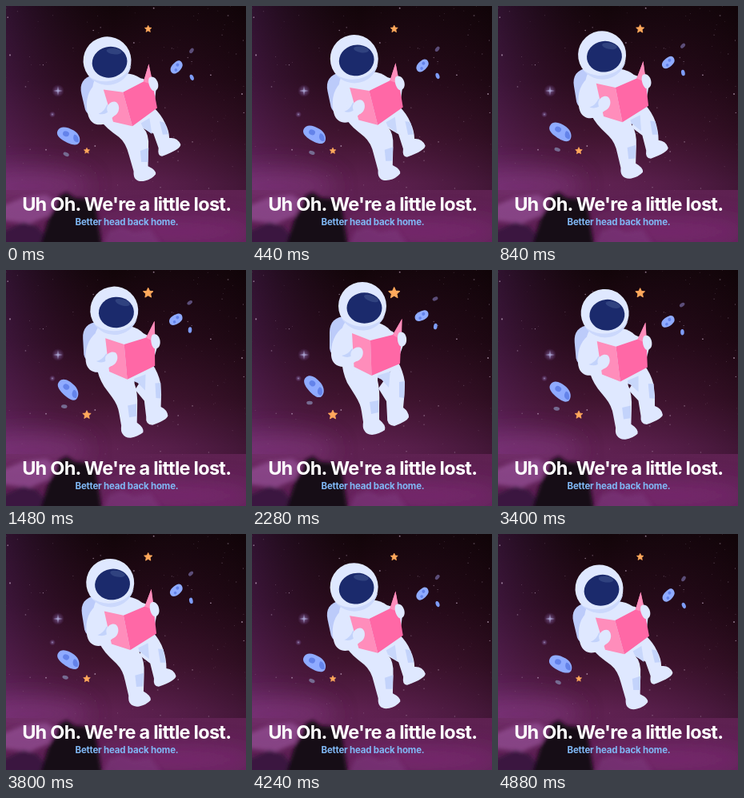
An HTML page that plays this animation: 300 px wide and 295 px high, repeating every 4.92 s.

```html
<!DOCTYPE html>
<html lang="en">
<head>
<meta charset="utf-8">
<style>
  html, body { margin: 0; width: 100%; height: 100%; overflow: hidden; background: #14060f; }
  svg { display: block; width: 300px; height: 295px; }
  text { font-family: Inter, sans-serif; font-weight: 700; text-anchor: middle; }
</style>
</head>
<body>
<svg viewBox="0 0 300 295">
  <defs>
    <linearGradient id="sky" x2="0" y2="1">
      <stop offset="0" stop-color="#120509"/>
      <stop offset=".3" stop-color="#250a18"/>
      <stop offset=".55" stop-color="#40142f"/>
      <stop offset=".75" stop-color="#5e2150"/>
      <stop offset="1" stop-color="#5f2257"/>
    </linearGradient>
    <linearGradient id="side">
      <stop offset="0" stop-color="#7a3390" stop-opacity=".28"/>
      <stop offset=".45" stop-color="#3c1232" stop-opacity="0"/>
      <stop offset="1" stop-color="#0c0205" stop-opacity=".35"/>
    </linearGradient>
    <radialGradient id="glow">
      <stop offset="0" stop-color="#b5b5e0" stop-opacity=".8"/>
      <stop offset=".35" stop-color="#8f74b4" stop-opacity=".45"/>
      <stop offset="1" stop-color="#8054a0" stop-opacity="0"/>
    </radialGradient>
    <filter id="soft" x="-30%" y="-50%" width="160%" height="200%"><feGaussianBlur stdDeviation="2.5"/></filter>
    <filter id="haze" x="-50%" y="-50%" width="200%" height="200%"><feGaussianBlur stdDeviation="14"/></filter>
    <path id="star" d="M0-6.5 1.9-2.4 6.3-2 3 1.1 3.9 5.5 0 3.2-3.9 5.5-3 1.1-6.3-2-1.9-2.4Z"
      fill="#ffa95c" stroke="#ffa95c" stroke-linejoin="round"/>
  </defs>

  <rect width="300" height="295" fill="url(#sky)"/>
  <rect width="300" height="230" fill="url(#side)"/>
  <g filter="url(#haze)">
    <ellipse cx="30" cy="225" rx="75" ry="22" fill="#8a3c88" opacity=".5"/>
    <ellipse cx="215" cy="282" rx="100" ry="16" fill="#8b3080" opacity=".6"/>
  </g>
  <g filter="url(#soft)">
    <path d="M-5 250 20 240 50 236 62 244 54 262 30 272-5 268Z" fill="#935095" opacity=".75"/>
    <path d="M-5 282 22 270 40 276 58 300H-5Z" fill="#3a1740"/>
    <path d="M42 300 54 264 64 250 66 238 76 233 86 240 100 241 112 249 115 270 120 300Z" fill="#150812"/>
    <path d="M122 300 128 282 145 276 160 283 180 279 195 300Z" fill="#7c3a7c" opacity=".6"/>
  </g>
  <g id="stars" fill="#cdb3cc"></g>
  <circle cx="65" cy="106" r="8" fill="url(#glow)"/>
  <path d="M65 100 65.7 105.3 71 106 65.7 106.7 65 112 64.3 106.7 59 106 64.3 105.3Z" fill="#a9a2d0"/>
  <circle cx="58" cy="135.5" r="4" fill="url(#glow)"/>

  <use id="starA" href="#star"/>
  <use id="starB" href="#star"/>

  <g id="rockA">
    <path d="M-15-2C-14-9-5-10 4-8 12-6 16 0 15 5 13 11 3 10-5 8-12 6-16 3-15-2Z" fill="#8fabff"/>
    <ellipse cx="-4" cy="-1" rx="4" ry="3.4" fill="#6483ea"/>
    <path d="M6-3C9-5 14 0 14 4 11 7 5 4 6-3Z" fill="#6483ea"/>
  </g>
  <ellipse id="pebbleA" rx="3.8" ry="2.3" fill="#756b91"/>
  <g id="rockB">
    <path d="M-9 0C-8-6 0-6 5-5 10-4 10 1 7 4 3 7-10 7-9 0Z" fill="#8fabff"/>
    <circle cx="3" cy="-1" r="2" fill="#6483ea"/>
    <circle cx="-3" cy="2" r="1.8" fill="#6483ea"/>
  </g>
  <ellipse id="pebbleB" rx="3.6" ry="2.2" fill="#5b4d78"/>
  <ellipse id="pebbleC" rx="3.8" ry="2.3" fill="#7d9cf8"/>

  <g id="astronaut" fill="#dfe8ff">
    <path d="M118 58C104 58 97 65 97 78V98Q98 107 107 107H120Z" fill="#bccbfa"/>
    <path id="legRight"/>
    <path id="patchRight" fill="#c3d3fb"/>
    <path d="M150 131 173 124 171 147 162 137Z" fill="#c8d7fb"/>
    <path id="legLeft"/>
    <path id="patchLeft" fill="#c3d3fb"/>
    <path d="M116 66C108 78 108 100 112 120L150 134 182 124 180 92C178 78 170 70 158 66Z"/>
    <path d="M166 74C178 76 184 82 189 94L184 108 170 100Z"/>
    <circle cx="138" cy="45" r="30"/>
    <path d="M112 60A30 30 0 0 0 166 57C156 73 128 76 112 60Z" fill="#cbd8fc"/>
    <ellipse cx="140.5" cy="47.5" rx="22" ry="19.3" fill="#1b2a6c"/>
    <ellipse cx="149" cy="35.5" rx="9.5" ry="3.8" transform="rotate(20 149 35.5)" fill="#30427f"/>
    <path d="M125 79 148 88 149.5 132 127.5 121Z" fill="#ff8dbb"/>
    <path d="M148 88 176 81 187.5 61 185 117 149.5 132Z" fill="#ff68a6"/>
    <path d="M176 81 187.5 61 187 88Z" fill="#ff8dbb"/>
    <path d="M115 71C103 78 98 94 99 107 100 119 110 123 120 120L134 112 128 101 116 103 121 85Z"/>
    <path d="M112 107Q120 106 125 98L128 104Q122 112 112 107Z" fill="#c3d3fb"/>
    <path d="M124 102C127 97 133 95 137 98 141 103 138 112 131 114 125 114 122 108 124 102Z"/>
    <path d="M184 78C188 76 192 79 193 85 194 92 190 97 185 95 181 91 181 81 184 78Z"/>
  </g>

  <text x="150.7" y="256" font-size="23.5" letter-spacing="-.75" fill="#fff">Uh Oh. We're a little lost.</text>
  <text x="151" y="273.5" font-size="11.5" letter-spacing="-.2" fill="#80b8f5">Better head back home.</text>
</svg>
<script>
const LOOP = 4920, LEAD = 130;
const $ = id => document.getElementById(id);

let seed = 11;
const random = () => (seed = seed * 16807 % 2147483647) / 2147483647;
let dots = '';
for (let i = 0; i < 150; i++) {
  const x = random() * 300, y = random() ** 1.2 * 235, r = .3 + random() ** 5 * .8;
  dots += `<circle cx="${x}" cy="${y}" r="${r}" opacity="${.25 + random() * .5}"/>`;
}
$('stars').innerHTML = dots;

// Each pose is [x, y, angle, scale] at the low and the high end of the float.
const parts = {
  starA: [[177.7, 28.7, 0, .68], [177.7, 28.7, 0, 1.08]],
  starB: [[101, 181, 0, .58], [101, 181, 0, .9]],
  rockA: [[78.5, 162, 17, 1], [78, 145, 38, 1]],
  pebbleA: [[75.2, 185.5, 25, 1], [72, 166, 0, 1]],
  rockB: [[213, 76.5, -46, 1], [212, 57, -24, 1]],
  pebbleB: [[232, 56, -55, 1], [229, 36, -25, 1]],
  pebbleC: [[232.3, 89.5, 68, 1], [229.3, 70.5, 100, 1]],
  astronaut: [[126.5, 68.5, -13.5, 1], [138, 45, 0, 1]]
};

// The legs bend at the low end and stretch at the high end.
const bends = {
  legLeft: [
    'M112 112Q113 121 124 134L130 141Q137 150 137 166L138 187Q136 194 138 197 141 202 149 202 158 202 164 197 166 192 157 185L163 162Q168 146 162 137L158 115Z',
    'M112 112Q113 128 119 141L129 157Q136 168 137 177L139 190Q138 197 140 200 143 206 150 206 159 205 166 200 168 194 159 187L159 170Q160 150 157 138L158 115Z'
  ],
  legRight: [
    'M180 114Q188 126 190 137 193 148 191 157 201 158 203 168 202 174 177 177 171 176 175 166L173 147 160 136Z',
    'M182 114Q189 126 191 140 191 156 189 172 196 177 196 184 194 189 178 195 168 194 169 184L168 164 158 148Z'
  ],
  patchLeft: ['M152 164 163 163 158 180 150 178Z', 'M147 165 158 163 158 178 149 180Z'],
  patchRight: ['M184 134 190 137 191 152 184 151Z', 'M184 140 191 139 190 160 184 159Z']
};

const mix = (a, b, p) => a + (b - a) * p;

function mixPath(low, high, p) {
  const ends = high.match(/\d+/g);
  let i = 0;
  return low.replace(/\d+/g, n => mix(+n, +ends[i++], p));
}

const ease = u => u < .5 ? 2 * u * u : 1 - 2 * (1 - u) ** 2;

function draw(now) {
  const cycle = (now + LEAD) % LOOP / LOOP * 2;
  const p = ease(cycle < 1 ? cycle : 2 - cycle);
  for (const [id, [low, high]] of Object.entries(parts)) {
    const [x, y, angle, scale] = low.map((v, i) => mix(v, high[i], p));
    const origin = id === 'astronaut' ? 'translate(-138 -45)' : '';
    $(id).setAttribute('transform', `translate(${x} ${y}) rotate(${angle}) scale(${scale}) ${origin}`);
  }
  for (const [id, [low, high]] of Object.entries(bends)) {
    $(id).setAttribute('d', mixPath(low, high, p));
  }
}

const start = performance.now();
function tick() {
  draw(performance.now() - start);
  requestAnimationFrame(tick);
}
draw(0);
requestAnimationFrame(tick);
</script>
</body>
</html>
```
